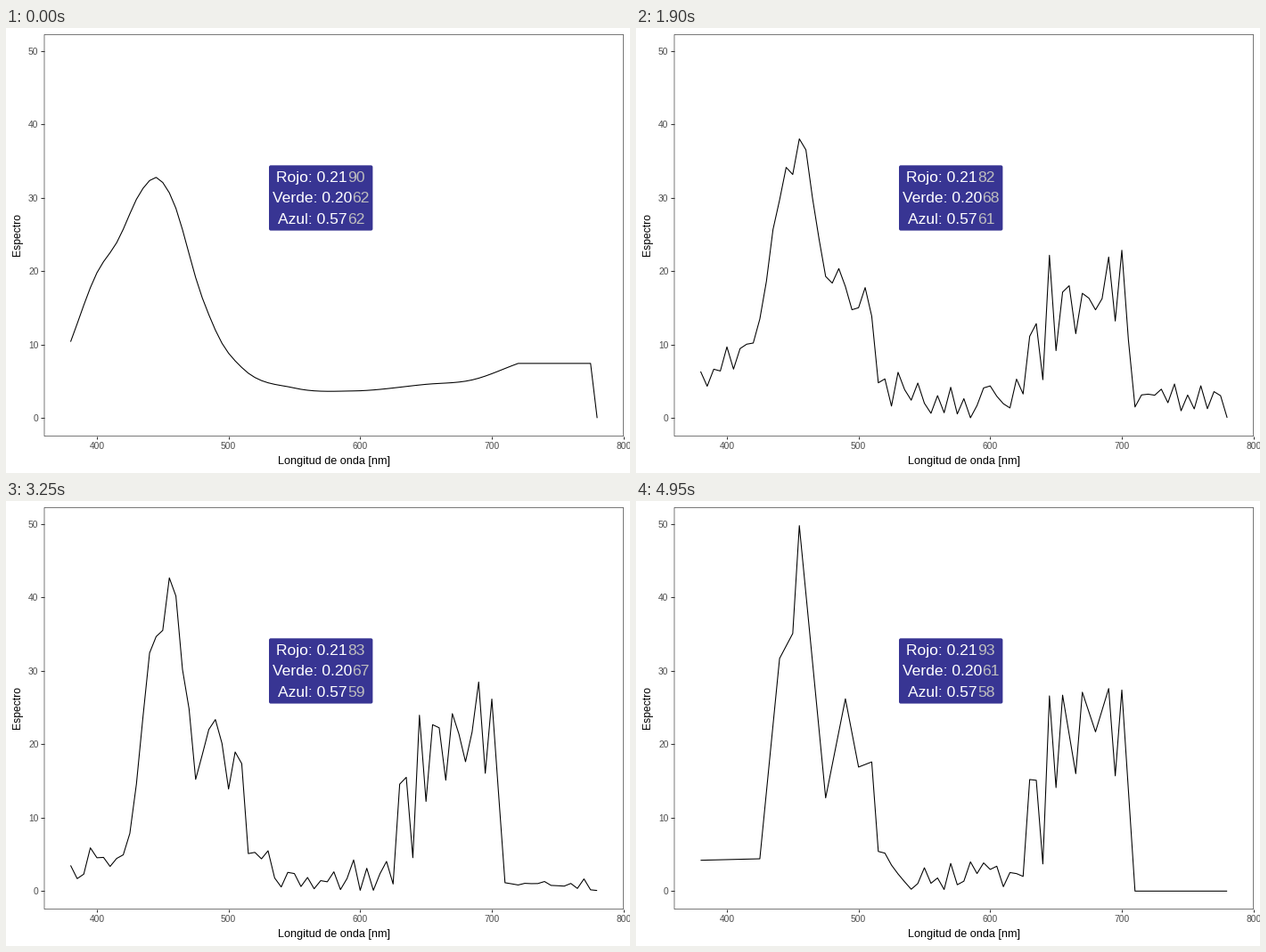
Write a matplotlib script that moves like this. It is 700 by 500 pixels and loops after 5000 ms.

```python
import numpy as np
import matplotlib.pyplot as plt
from matplotlib.animation import FuncAnimation
from matplotlib.patches import FancyBboxPatch, Rectangle

W, H, DPI = 700, 500, 100
PX = 72 / DPI
FRAMES = 100
FONT = "Liberation Sans"
WAVES = np.arange(380, 781, 5)
TIME = np.linspace(0, 1, FRAMES)
LEFT, RIGHT, TOP, BOTTOM = 43, 692.6, 7.4, 458.6

# Key points (wavelength, level) of the first and last spectrum
SMOOTH = [(380, 10.4), (400, 19.8), (415, 23.9), (435, 31.3), (445, 32.8),
          (455, 30.7), (480, 16.4), (495, 10.2), (510, 6.9), (550, 4.1),
          (595, 3.7), (650, 4.6), (685, 5.2), (720, 7.45)]
SPIKY = [(380, 4.2), (425, 4.4), (440, 31.7), (450, 35.1), (455, 49.8),
         (475, 12.7), (490, 26.2), (500, 16.9), (510, 17.6), (515, 5.4),
         (530, 2), (625, 2), (630, 15.2), (635, 15.1), (640, 3.7), (645, 26.6),
         (650, 14.1), (655, 26.7), (665, 16), (670, 27.1), (680, 21.7),
         (690, 27.6), (695, 15.7), (700, 27.4), (710, 0), (780, 0)]

# Fixed text, then first value, last value and swing of the last two decimals
CHANNELS = [("Rojo: 0.21", 90, 93, -10, 383, 173.2),
            ("Verde: 0.20", 62, 61, 6, 388, 196.4),
            ("Azul: 0.57", 62, 58, 0, 383, 219.8)]

rng = np.random.default_rng(7)


def sx(wave):
    return 102 + (wave - 400) * 1.4767


def sy(level):
    return 438.3 - level * 8.246


def hermite(points, x):
    """Smooth curve through the points."""
    px, py = np.array(points, float).T
    slope = np.gradient(py, px)
    k = np.clip(np.searchsorted(px, x, "right") - 1, 0, len(px) - 2)
    h = px[k + 1] - px[k]
    u = (x - px[k]) / h
    ease = u * u * (3 - 2 * u)
    bend = u * (1 - u) * h * (slope[k] * (1 - u) - slope[k + 1] * u)
    return py[k] + (py[k + 1] - py[k]) * ease + bend


def bridge(step):
    """Random walk per wavelength that starts and ends at zero."""
    walk = np.cumsum(rng.normal(0, step, (FRAMES, len(WAVES))), axis=0)
    walk -= walk[0]
    return walk - TIME[:, None] * walk[-1]


def make_spectra():
    start = hermite(SMOOTH, np.minimum(WAVES, 720))
    start[-1] = 0
    end = np.interp(WAVES, *zip(*SPIKY))
    low = (WAVES > 515) & (WAVES < 625)
    end += low * rng.uniform(-1.8, 2.5, len(WAVES))

    # The main peak grows steadily, the rest settles early
    near_peak = np.exp(-((WAVES - 455) / 8) ** 2)
    power = 2.2 - 1.2 * near_peak
    mix = 1 - (1 - TIME[:, None]) ** power
    base = start + (end - start) * mix
    noise = bridge(0.4) * (1 - 0.8 * near_peak)
    return np.abs(base + noise * np.clip(base / 3, 0.05, 1))


def make_digits(first, last, swing):
    arc = np.sin(np.pi * TIME)
    jitter = rng.uniform(-1, 1, FRAMES) * arc
    return np.rint(first + (last - first) * TIME + swing * arc ** 2 + jitter)


spectra = make_spectra()

fig = plt.figure(figsize=(W / DPI, H / DPI), dpi=DPI, facecolor="white")
ax = fig.add_axes([0, 0, 1, 1])
ax.set(xlim=(0, W), ylim=(H, 0))
ax.axis("off")


def label(x, y, text, size, color="black", **kw):
    kw = {"ha": "center", "va": "baseline", **kw}
    return ax.text(x, y, text, fontsize=size * PX, color=color, family=FONT, **kw)


def tick(xs, ys):
    ax.plot(xs, ys, color="#333333", lw=1.07 * PX, solid_capstyle="butt")


ax.add_patch(Rectangle((LEFT, TOP), RIGHT - LEFT, BOTTOM - TOP, fill=False,
                       ec="#333333", lw=0.65 * PX, snap=False))
for level in range(0, 51, 10):
    tick([LEFT - 3.6, LEFT], [sy(level)] * 2)
    label(36.5, sy(level), str(level), 10.2, "#4d4d4d", ha="right",
          va="center_baseline")
for wave in range(400, 801, 100):
    tick([sx(wave)] * 2, [BOTTOM, BOTTOM + 3.6])
    label(sx(wave), 473, str(wave), 10.2, "#4d4d4d")
label(367.8, 490, "Longitud de onda [nm]", 12.6)
label(13, 232.5, "Espectro", 12.1, rotation=90, va="center")

line, = ax.plot([], [], color="black", lw=1.07 * PX, solid_joinstyle="round",
                solid_capstyle="butt")

ax.add_patch(FancyBboxPatch((297, 156.3), 112.4, 69.3,
                            boxstyle="round,pad=2,rounding_size=2",
                            fc=(0.219, 0.2062, 0.5762), ec="none", zorder=3))
counters = []
for name, first, last, swing, x, y in CHANNELS:
    label(x, y, name, 17.5, "white", ha="right", zorder=4)
    text = label(x, y, "", 17.5, "#bebebe", ha="left", zorder=4)
    counters.append((text, make_digits(first, last, swing)))


def draw(i):
    line.set_data(sx(WAVES), sy(spectra[i]))
    for text, values in counters:
        text.set_text(f"{values[i]:02.0f}")
    return [line, *(text for text, _ in counters)]


anim = FuncAnimation(fig, draw, frames=FRAMES, interval=50, repeat=True,
                     repeat_delay=0)
plt.show()
```
